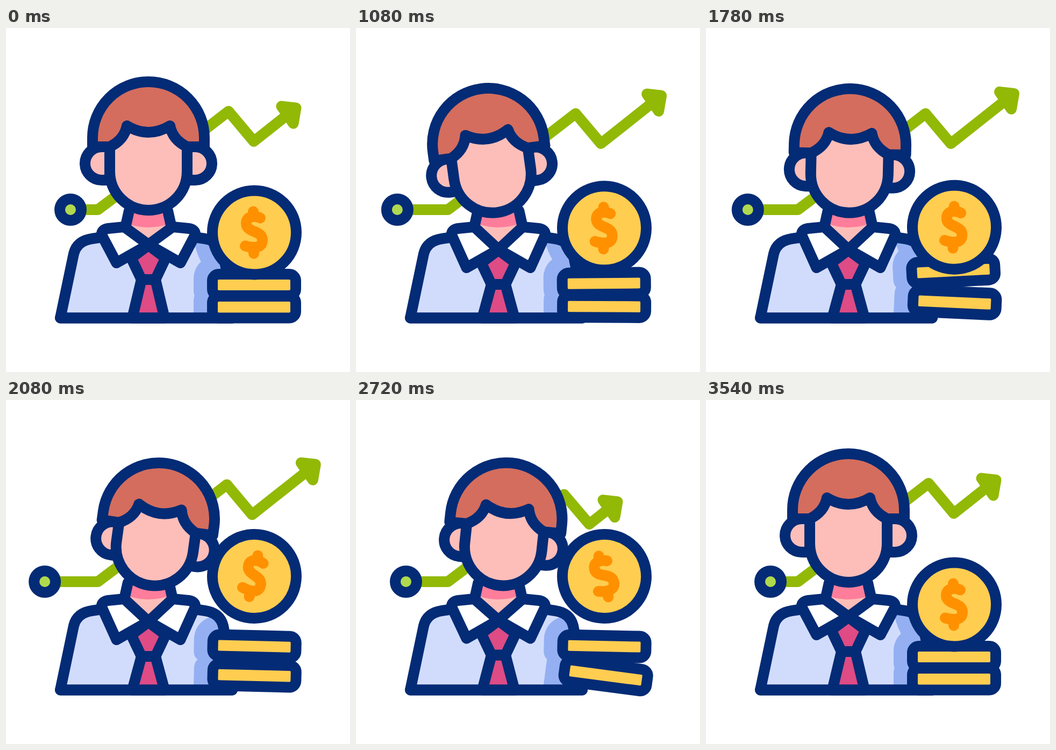
Animation, 640 px wide and 640 px high, one loop 3.6 s. Source, as an HTML page:

```html
<!DOCTYPE html>
<html lang="en">
<head>
<meta charset="utf-8">
<title>Investor</title>
<style>
  html, body { margin: 0; width: 100%; height: 100%; overflow: hidden; background: #fff; }
  svg { display: block; width: 100vw; height: 100vh; }
  .ink { stroke: #042b75; stroke-width: 20; stroke-linecap: round; stroke-linejoin: round; }
  .green { fill: none; stroke: #92b906; stroke-width: 20; stroke-linecap: round; stroke-linejoin: round; }
  .skin { fill: #fdbeb9; }
  .gold { fill: #ffcd50; }
  .shade { fill: #94b0f2; }
  .none { fill: none; }
</style>
</head>
<body>
<svg viewBox="0 0 640 640">
  <defs>
    <path id="torso" d="M101 540L126 420Q132 396 160 392L185 388H345L370 392Q398 396 404 420L421 540Z"/>
    <clipPath id="inside"><use href="#torso"/></clipPath>
  </defs>

  <path id="rise" class="green"/>
  <path id="barb" class="green" style="fill:#92b906" d="M-27 -3L0 0L-5 29Z"/>
  <path id="base" class="green"/>
  <circle id="dot" cy="338" r="20" class="ink" fill="#b0d950"/>

  <path class="skin" d="M229 340L223 370L265 410L307 370L301 340Z"/>
  <path fill="#fe7d9b" d="M229 335L223 363Q265 379 307 363L301 335Z"/>
  <path id="neck" class="ink none"/>

  <use href="#torso" fill="#d1dcfd"/>
  <path id="throat" class="skin"/>
  <g clip-path="url(#inside)" class="shade">
    <circle id="coinShade" cx="462" r="113"/>
    <path id="topShade" d="M349 466A44 43 0 0 1 393 423H560V508H369Q349 508 349 488Z"/>
    <path id="lowShade" d="M349 560V508Q349 488 369 488H560V560Z"/>
  </g>
  <path class="ink none" d="M421 539.5H101L126 420Q132 396 160 392L180 389M350 389L370 392Q398 396 404 420L410 450"/>

  <path id="tail" class="ink" fill="#de4b85"/>
  <path id="knot" class="ink" fill="#de4b85"/>
  <path id="collarL" class="ink" fill="#fff"/>
  <path id="collarR" class="ink" fill="#fff" transform="matrix(-1 0 0 1 530 0)"/>
  <path class="ink none" d="M101 539.5H421"/>

  <g id="head">
    <path id="earL" class="ink skin" d="M193 221H178A31 31 0 0 0 178 283H193Z"/>
    <path id="earR" class="ink skin" d="M337 221H352A31 31 0 0 1 352 283H337Z"/>
    <path class="skin" d="M193 222L225 182H305L337 222Z"/>
    <path id="face" class="ink skin"/>
    <path class="ink" fill="#d46d5d" d="M161 221V204A104 104 0 0 1 369 204V221H337Q310 208 305 182Q265 206 225 182Q220 208 193 221Z"/>
  </g>

  <g id="low"><rect class="ink gold" x="384" y="499" width="155" height="40.5" rx="12"/></g>
  <g id="top"><rect class="ink gold" x="384" y="458" width="155" height="40" rx="12"/></g>
  <g id="coin">
    <circle class="ink gold" r="78"/>
    <path fill="none" stroke="#ff9100" stroke-width="20" stroke-linecap="round"
      d="M11 -27C3 -31 -15 -32 -15 -17C-15 1 15 -5 15 14C15 32 -6 28 -17 25M-2 -39V-31M-1 29V39"/>
  </g>
</svg>

<script>
const LOOP = 3600, BEGIN = 200, END = 3540;
const el = {};
document.querySelectorAll('[id]').forEach(n => el[n.id] = n);
const set = (name, attr, value) => el[name].setAttribute(attr, value);

const clamp = u => Math.min(1, Math.max(0, u));
const ease = u => u * u * (3 - 2 * u);

// Eases from each [time, value] pose to the next.
const poses = (...keys) => t => keys.reduce((v, [at, to], i) => {
  if (!i) return to;
  const from = keys[i - 1][0];
  return v + (to - v) * ease(clamp((t - from) / (at - from)));
}, 0);

// Rises to a level, holds it and falls back to zero.
const swell = (a, b, c, d, level) => poses([a, 0], [b, level], [c, level], [d, 0]);

const dotX = poses([BEGIN, 120], [860, 72], [1440, 87], [2030, 72], [END, 120]);
const slide = poses([600, 0], [1450, 9], [2050, 3], [2720, 27], [3100, 0]);
const reach = poses([BEGIN, 79], [860, 121], [1320, 104], [1980, 122], [2720, 53], [3150, 131], [3420, 79]);

const headTurn = poses([BEGIN, 0], [950, -7.8], [1270, -7.8], [2250, 9.2], [3430, 0]);
const headDrop = poses([BEGIN, 0], [800, 10.8], [1500, 10.8], [2100, 15.6], [2720, 16], [3430, 0]);
const collarDrop = swell(BEGIN, 600, 2300, END, 9);

const coinLife = swell(BEGIN, 500, 3020, END, 1);
const stackLift = poses([1000, 0], [1450, 1], [2080, 0.6], [2720, 0.6], [3080, 0]);
const topTurn = poses([1000, 0], [1480, -7.5], [2080, 1.4], [2720, 1.2], [3080, 0]);
const lowTurn = poses([1000, 0], [1480, 3.8], [2080, 1.4], [2720, 7.5], [3080, 0]);

function drawChart(t) {
  const s = slide(t), r = reach(t), x = dotX(t);
  const px = 414 - s, py = 155 + s * 0.77;
  const tx = 461 - s, ty = 211 + s * 0.74;
  const ax = tx + r - 0.5, ay = ty - r * 0.79;
  set('rise', 'd', `M${px - 70} ${py + 54}L${px} ${py}L${tx} ${ty}L${ax - 6} ${ay + 5}`);
  set('barb', 'transform', `translate(${ax} ${ay})`);
  set('base', 'd', `M${x} 338H171L240 286`);
  set('dot', 'cx', x);
}

function drawHead(t) {
  const drop = headDrop(t), chin = 267 - drop * 0.63, tuck = drop * 0.45;
  set('head', 'transform', `translate(0 ${drop}) rotate(${headTurn(t)} 265 343)`);
  set('earL', 'transform', `translate(${tuck} 0)`);
  set('earR', 'transform', `translate(${-tuck} 0)`);
  set('face', 'd', `M193 221V${chin}A72 72 0 0 0 337 ${chin}V221`);
}

function drawCollar(t) {
  const c = collarDrop(t), y = 468 + c, n = c * 0.25;
  const wing = `M178 385Q177 375 190 373L220 370L265 ${403 + c}L205.5 ${437 + c}Z`;
  set('neck', 'd', `M${229 - n} 340L${223 - n} 367M${301 + n} 340L${307 + n} 367`);
  set('collarL', 'd', wing);
  set('collarR', 'd', wing);
  set('throat', 'd', `M223 367Q265 375 307 367L265 ${403 + c}Z`);
  set('knot', 'd', `M252 ${y}L233 ${428 + c}L265 ${404 + c}L297 ${428 + c}L278 ${y}Z`);
  set('tail', 'd', `M252 ${y}L235 539.5H295L278 ${y}Z`);
}

function placeSlab(name, turn, up, cy) {
  const pose = `translate(${turn * 0.43} ${-up}) rotate(${turn} 462 ${cy})`;
  set(name, 'transform', pose);
  set(name + 'Shade', 'transform', pose);
}

function drawCoins(t) {
  // One long first hop, then even ones, leaning to alternate sides.
  const hop = t < 1100 ? (t - BEGIN) / 900 : 1 + (t - 1100) / 640;
  const swing = Math.sin(Math.PI * hop), life = coinLife(t), lift = stackLift(t);
  const y = 380.5 - life * (8 + 45 * swing * swing);
  set('coin', 'transform', `translate(462 ${y}) rotate(${12.5 * swing * life})`);
  set('coinShade', 'cy', y);
  placeSlab('top', topTurn(t), 33 * lift, 478);
  placeSlab('low', lowTurn(t), 11 * lift, 519);
}

const start = performance.now();
function draw() {
  const t = Math.max(0, performance.now() - start) % LOOP;
  drawChart(t);
  drawHead(t);
  drawCollar(t);
  drawCoins(t);
  requestAnimationFrame(draw);
}
draw();
</script>
</body>
</html>
```
